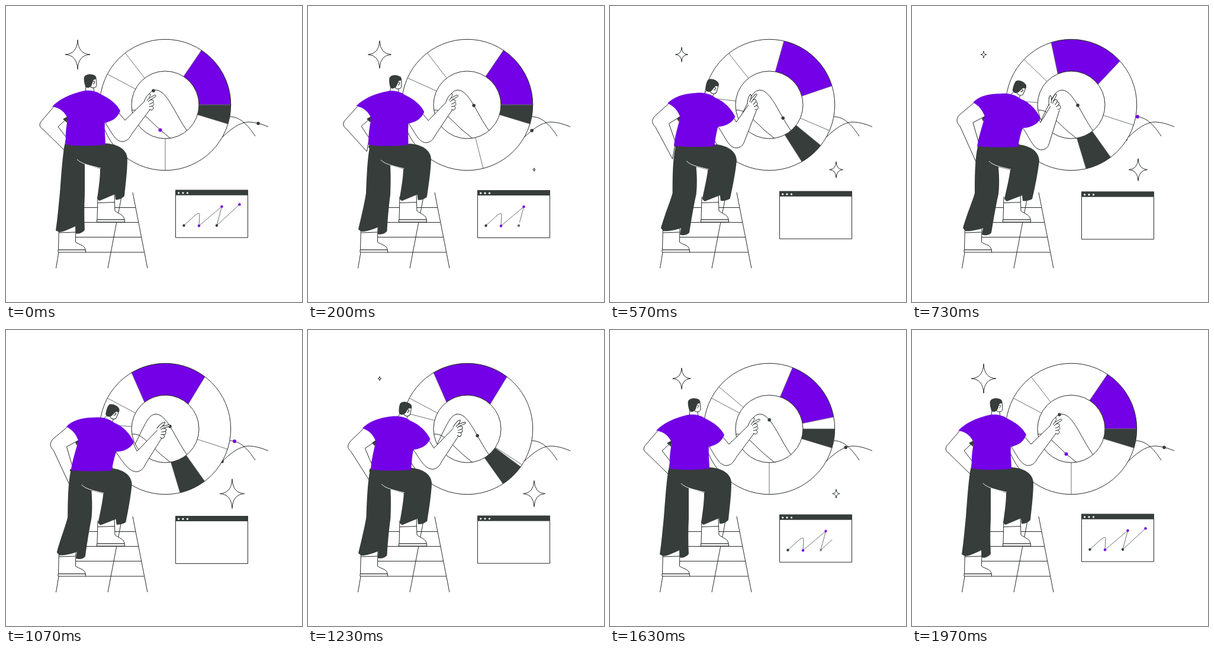
These frames come from a looping animation (500 px wide and 500 px high, 2000 ms). An HTML page:

```html
<!DOCTYPE html>
<html lang="en">
<head>
<meta charset="utf-8">
<title>Chart presentation</title>
<style>
  html, body { margin: 0; width: 100%; height: 100%; overflow: hidden; background: #fff; }
  svg { display: block; width: 100%; height: 100%; }
  .line { fill: none; stroke: #262b29; stroke-width: 1; stroke-linejoin: round; }
  .skin { fill: #fff; stroke: #262b29; stroke-width: 1; stroke-linejoin: round; }
  .thin { fill: none; stroke: #6c716f; stroke-width: 1; }
  .dark { fill: #363d3a; }
  .purple { fill: #7300e6; }
  .star { fill: #fff; stroke: #262b29; }
</style>
</head>
<body>
<svg viewBox="0 0 500 500">
  <!-- curves run beneath the ring -->
  <path class="line" d="M217,195 C232,165 240,145 249,143"/>
  <path class="line" id="darkRail" d="M249,143 Q251,142 253,142 C272,142 285,182 306,211 C325,238 345,240 366,221 C385,203 397,197 409,196 C422,196 433,200 443,204"/>
  <path class="line" id="purpleRail" d="M213,176 C222,175 228,179 238,188 L260,209 L277,223 C300,244 312,258 320,254 C335,235 350,187 378,187 C395,187 408,200 421,220"/>
  <circle id="dotA" class="dark" r="2.8"/>
  <circle id="dotB" class="dark" r="2.8"/>
  <circle id="dotP" class="purple" r="3"/>

  <circle cx="269" cy="167" r="84" fill="none" stroke="#fff" stroke-width="53.5"/>
  <path id="dividers" class="thin"/>
  <path id="purplePart" class="purple" stroke="#6c716f" stroke-width=".7"/>
  <path id="darkPart" class="dark" stroke="#6c716f" stroke-width=".7"/>
  <circle class="line" cx="269" cy="167" r="110.7"/>
  <circle class="line" cx="269" cy="167" r="57"/>

  <path id="starA" class="star"/>
  <path id="starB" class="star"/>

  <g id="panel">
    <rect class="line" x="286.5" y="311" width="122" height="80"/>
    <rect class="dark" x="286" y="310.5" width="123" height="9"/>
    <g fill="#fff">
      <circle cx="291.7" cy="315.6" r="1.6"/><circle cx="299" cy="315.6" r="1.6"/><circle cx="306.5" cy="315.6" r="1.6"/>
    </g>
    <path id="chart" class="thin" pathLength="1" d="M300.5,370.5 L318,354.5 Q327,347 327,352 L326,371 L364.5,338.5 L356,370.5 L394.5,335"/>
    <g id="chartDots">
      <circle class="dark" cx="300.5" cy="370.5" r="2.2"/>
      <circle class="purple" cx="326" cy="371" r="2.2"/>
      <circle class="purple" cx="364.5" cy="338.5" r="2.2"/>
      <circle class="dark" cx="356" cy="370.5" r="2.2"/>
      <circle class="purple" cx="394.5" cy="335" r="2.2"/>
    </g>
  </g>

  <path class="line" d="M89,416 L84.5,443 M197,312 L172,443 M214,315 L239,443 M120,340.5 H219 M120,365.5 H224 M118,390.5 H229 M134,416 H233.5"/>
  <g class="skin">
    <path d="M155,322 L154,361 H200 C200,353 190,351 184,346 L183,316"/>
    <path d="M155,332.5 L183,331.5"/>
    <path d="M153.5,361 H200.5 V365 H153.5 Z"/>
    <path d="M89.5,372 L88.5,412 H134 C134,404 123,403 117.5,399 L118,370"/>
    <path d="M89.5,383 L118,382"/>
    <path d="M88,412 H134.5 V416 H88 Z"/>
  </g>

  <path id="leftArm" class="skin"/>
  <path id="cuff" class="dark"/>
  <path id="rightArm" class="skin"/>
  <g id="hand" class="skin">
    <path d="M233,162 C235,157 238,150 243,148 C245,149 243,153 241,156 L251,150.5 C254,150 254,153 251,154 L243,159 C248,157 251,160 248,163 C251,165 250,168 247,169 C250,171 249,175 246,176 L242,174.5"/>
    <path d="M241,156 L238,160 M243,159 L240,162 M248,163 L242,166 M247,169 L242,170" fill="none"/>
  </g>
  <path id="neck" class="skin"/>
  <g id="head">
    <path class="skin" d="M146,119 L152,121 L153,134 C152,138 149,138.5 145,138 L136,132 Z"/>
    <path class="dark" d="M132,120 C135,114 146,114 151,118 C153,121 152,125 149.5,124 C146,125 147,130 144,135 C141,139 136,139 134,136 C132,130 131,124 132,120 Z"/>
    <path class="skin" d="M147,128 C150,125 151,130 147,132"/>
  </g>
  <path id="rearLeg" class="dark"/>
  <path id="frontLeg" class="dark"/>
  <path id="crease" fill="none" stroke="#fff" stroke-width="1"/>
  <path id="shirt" class="purple"/>
</svg>
<script>
const LOOP = 2000;
const $ = id => document.getElementById(id);
const clamp = v => Math.max(0, Math.min(1, v));
const ease = (t, from, to) => (1 - Math.cos(Math.PI * clamp((t - from) / (to - from)))) / 2;
const pulse = (t, up0, up1, down0, down1) => ease(t, up0, up1) - ease(t, down0, down1);
const lerp = (a, b, k) => a + (b - a) * k;

// Smooth monotone interpolation through [time, value] keys
function track(t, keys) {
  const last = keys.length - 1;
  const rise = i => (keys[i + 1][1] - keys[i][1]) / (keys[i + 1][0] - keys[i][0]);
  const slope = i => {
    if (i === 0 || i === last) return 0;
    const a = rise(i - 1), b = rise(i);
    return a * b > 0 ? 2 * a * b / (a + b) : 0;
  };
  let i = 0;
  while (i < last - 1 && t >= keys[i + 1][0]) i++;
  const [t0, v0] = keys[i], [t1, v1] = keys[i + 1];
  const span = t1 - t0, u = clamp((t - t0) / span), w = 1 - u;
  return v0 * (1 + 2 * u) * w * w + v1 * u * u * (3 - 2 * u)
    + span * u * w * (slope(i) * w - slope(i + 1) * u);
}

// Blend paths of equal structure: upright, leaning and optionally reaching
function blend(upright, leaning, lean, reaching = leaning, reach = 0) {
  const nums = s => s.match(/-?[\d.]+/g).map(Number);
  const b = nums(leaning), c = nums(reaching);
  let i = 0;
  return upright.replace(/-?[\d.]+/g, a => {
    const v = lerp(+a, b[i], lean) + (c[i] - b[i]) * reach;
    i++;
    return v.toFixed(2);
  });
}

const upperBody = {
  shirt: [
    'M78,170 C90,157 110,148 133,143 C140,142 152,143 160,149 C175,156 187,165 193,177 C189,188 180,195 167,197 C166,210 168,222 168,234 C145,237 120,237 101,234 C100,215 102,205 104,190 C100,180 92,172 78,170 Z',
    'M103,163 C112,153 128,148 150,148 C162,147 173,149 184,157 C200,163 212,178 217,190 C212,200 200,206 187,206 C183,217 181,227 179,238 C155,239 130,239 110,237 C113,220 118,205 123,187 C119,176 114,169 103,163 Z'],
  leftArm: [
    'M80,171 L62,192 C55,199 56,204 62,208 L98,243 L102,222 L88,204 L105,188',
    'M104,164 L80,184 C74,191 75,197 81,203 L108,263 L113,232 L103,197 L122,187'],
  cuff: ['M96,191 L105,186 L103,197 Z', 'M118,190 L127,182 L120,195 Z'],
  neck: ['M135,136 L134,147 L149,147 L148,138', 'M171,146 L163,153 L180,157 L185,147']
};
const hipLine = {
  frontLeg: [
    'M101,232 C120,237 150,237 168,232 C190,233 204,243 205,257 C205,280 202,300 200,321 C196,325 190,328 185,327 L184,318 L158,329 L154,326 C157,305 159,290 159,275 L133,267 L98,240 Z',
    'M110,236 C130,239 160,238 180,234 C200,236 215,246 215,262 C212,285 208,305 203,326 C198,329 190,330 187,329 L186,320 L160,330 L156,326 C160,308 164,292 166,277 L146,272 L111,237 Z'],
  crease: ['M120,259 C126,265 134,268 160,274', 'M130,262 C136,268 144,271 167,276']
};
const rearLeg = [
  'M101,232 L150,235 L150,270 L133,267 C133,285 133,300 133,318 C132,340 132,360 133,378 C130,383 122,386 118,384 L117,372 C105,378 95,382 90,382 L84,379 C87,360 89,335 91,316 C93,290 95,260 98,240 Z',
  'M110,236 L155,238 L158,273 L146,272 C148,295 147,310 146,318 C141,340 137,365 134,383 C130,388 122,388 118,386 L120,375 C110,379 95,381 90,380 L86,375 C95,345 104,325 106,316 C106,290 106,260 111,237 Z'];
const rightArm = [
  'M233,162 L201,193 L190,180 L168,198 C178,212 184,229 197,229 C207,228 210,220 214,214 L243,175',
  'M236,166 L217,197 L213,188 L187,206 C200,224 205,243 219,243 C230,242 231,234 233,228 L249,176',
  'M258,167 L222,205 L214,188 L186,206 C199,224 208,240 222,240 C231,239 234,232 237,226 L263,183'];

const LEAN = [[0, 0], [370, .35], [730, 1], [880, 1.02], [1070, .96], [1430, .02], [1500, 0], [LOOP, 0]];
const HIPS = [[0, 0], [370, .65], [730, 1], [1070, .77], [1430, .01], [1500, 0], [LOOP, 0]];
const STEP = [[0, 0], [370, .88], [730, 1], [1070, .88], [1430, .01], [1500, 0], [LOOP, 0]];
const FLOW = [[0, 0], [370, .58], [730, .97], [900, 1], [1080, 1], [1430, .63], [1630, .145], [1930, 0], [LOOP, 0]];
const STAR_A = [[0, 1], [370, .81], [730, .24], [1050, 0], [1430, .42], [1630, .72], [LOOP, 1]];
const STAR_B = [[0, 0], [370, .28], [730, .75], [1050, 1], [1430, .63], [1630, .3], [LOOP, 0]];

const polar = (deg, r) => {
  const a = deg * Math.PI / 180;
  return `${(269 + r * Math.sin(a)).toFixed(2)},${(167 - r * Math.cos(a)).toFixed(2)}`;
};
// Ring part whose inner edge may span other angles than its outer edge
const part = (from, to, innerFrom, innerTo) =>
  `M${polar(innerFrom, 57)} L${polar(from, 110.7)} A110.7,110.7 0 0 1 ${polar(to, 110.7)} L${polar(innerTo, 57)} A57,57 0 0 0 ${polar(innerFrom, 57)} Z`;

// Arc length at which a left-to-right path reaches x
function lengthAt(path, x) {
  let lo = 0, hi = path.getTotalLength();
  for (let i = 0; i < 24; i++) {
    const mid = (lo + hi) / 2;
    if (path.getPointAtLength(mid).x < x) lo = mid; else hi = mid;
  }
  return lo;
}
function rider(id, rail, fromX, toX) {
  const from = lengthAt(rail, fromX), to = lengthAt(rail, toX), dot = $(id);
  return k => {
    const p = rail.getPointAtLength(lerp(from, to, k));
    dot.setAttribute('cx', p.x);
    dot.setAttribute('cy', p.y);
  };
}
const riders = [
  rider('dotA', $('darkRail'), 249, 365),
  rider('dotB', $('darkRail'), 426, 277),
  rider('dotP', $('purpleRail'), 260.5, 386)
];

const setPath = (id, d) => $(id).setAttribute('d', d);
const setMove = (id, value) => $(id).setAttribute('transform', value);

function drawRing(t) {
  const rear = lerp(180, 108, pulse(t, 0, 690, 1080, 1576));
  const left = lerp(298, 274, pulse(t, 20, 720, 1070, 1420));
  const top = lerp(322.4, 298, pulse(t, 520, 1045, 1440, 1830));
  const dark = pulse(t, 300, 720, 1080, 1465);
  const purple = pulse(t, 380, 880, 1356, 1745);
  setPath('dividers', [rear, left, top].map(a => `M${polar(a, 57)} L${polar(a, 110.7)}`).join(' '));
  setPath('purplePart', part(lerp(33.5, -31, purple), lerp(90, 37.3, purple),
    lerp(32.8, -38, purple), lerp(90, 43, purple)));
  setPath('darkPart', part(lerp(90, 143, dark), lerp(107, 167, dark),
    lerp(90, 141.5, dark), lerp(107, 170.5, dark)));
}

function drawPanel(t) {
  setMove('panel', `translate(0 ${.2 + 3.4 * (1 - Math.cos(2 * Math.PI * t / LOOP)) / 2})`);
  const shown = 1 - pulse(t, 10, 522, 1252, 1752);
  $('chart').setAttribute('stroke-dasharray', `${shown} 2`);
  const progress = t < 1000 ? (490 - t) / 350 : (t - 1252) / 500;
  [0, .36, .53, .64, .9].forEach((start, i) =>
    $('chartDots').children[i].setAttribute('opacity', clamp((progress - start) * 4)));
}

function drawPerson(t) {
  const lean = track(t, LEAN), hips = track(t, HIPS);
  const reach = pulse(t, 740, 1010, 1090, 1390), turn = pulse(t, 375, 715, 1080, 1410);
  for (const id in upperBody) setPath(id, blend(...upperBody[id], lean));
  for (const id in hipLine) setPath(id, blend(...hipLine[id], hips));
  setPath('rearLeg', blend(...rearLeg, track(t, STEP)));
  setPath('rightArm', blend(rightArm[0], rightArm[1], lean, rightArm[2], reach));
  setMove('head', `translate(${39 * lean} ${11 * lean}) rotate(${27 * lean} 142 127)`);
  setMove('hand', `translate(${turn + 19 * reach} ${3 * turn + 2.5 * reach}) rotate(${-30 * turn + 45 * reach} 238 168)`);
}

function drawStar(id, x, y, size) {
  const w = 21 * size, h = 25 * size, n = size;
  const q = (cx, cy, ex, ey) => `Q${x + cx},${y + cy} ${x + ex},${y + ey} `;
  setPath(id, `M${x},${y - h} ` + q(n, -n, w, 0) + q(n, n, 0, h) + q(-n, n, -w, 0) + q(-n, -n, 0, -h) + 'Z');
  $(id).setAttribute('visibility', size < .005 ? 'hidden' : 'visible');
}

function render(t) {
  drawRing(t);
  drawPanel(t);
  drawPerson(t);
  drawStar('starA', 121, 82, track(t, STAR_A));
  drawStar('starB', 382, 276.5, track(t, STAR_B));
  const flow = track(t, FLOW);
  riders.forEach(move => move(flow));
}

const began = performance.now();
function tick() {
  render((performance.now() - began) % LOOP);
  requestAnimationFrame(tick);
}
tick();
</script>
</body>
</html>
```
